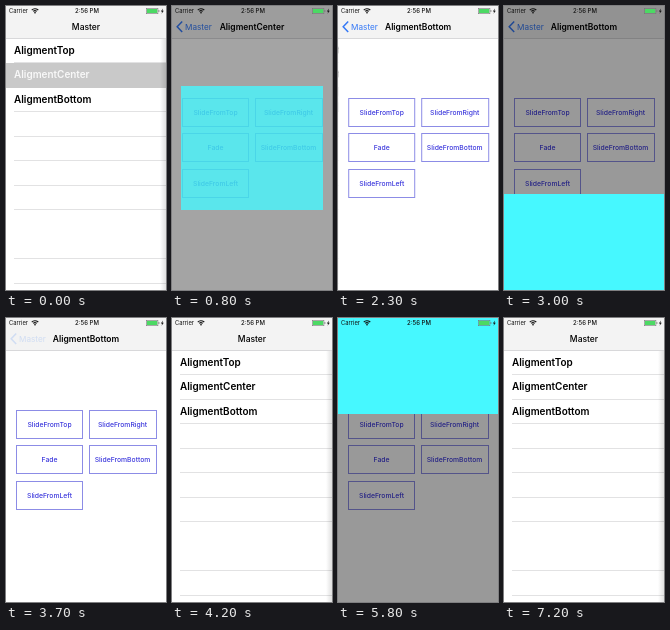
Recreate the animation shown at these times as an HTML page with a canvas. Size 160 by 284 pixels, loop 7.3 s.

```html
<!DOCTYPE html>
<html lang="en">
<head>
<meta charset="utf-8">
<style>
html, body { margin: 0; width: 100%; height: 100%; overflow: hidden; background: #fff; }
canvas { display: block; width: 160px; height: 284px; }
</style>
</head>
<body>
<canvas id="stage"></canvas>
<script>
const W = 160, H = 284, NAV = 33, LOOP = 7300, TICK = 100;
const BLUE = '#3478f6', CYAN = '#46f8ff';
const canvas = document.getElementById('stage');
const ctx = canvas.getContext('2d');
const ratio = window.devicePixelRatio || 1;
canvas.width = W * ratio;
canvas.height = H * ratio;

const rows = ['AligmentTop', 'AligmentCenter', 'AligmentBottom'];
const buttons = ['SlideFromTop', 'SlideFromRight', 'Fade', 'SlideFromBottom', 'SlideFromLeft'];

// Each visit: push a page, press a button, show and hide the popup, go back.
const visits = [
  { row: 1, push: 0, button: 2, press: 500, show: 600, hide: 1100, back: 1400 },
  { row: 2, push: 1900, button: 3, press: 2500, show: 2600, hide: 3200, back: 3700 },
  { row: 0, push: 4400, button: 0, press: 5000, show: 5100, hide: 6050, back: 6500 }
];

const clamp = v => Math.min(1, Math.max(0, v));
const easeOut = (v, power) => 1 - Math.pow(1 - clamp(v), power);
const span = (t, from, to, length, power) =>
  easeOut((t - from) / length, power) - easeOut((t - to) / length, power);

function box(color, x, y, w, h, alpha = 1) {
  ctx.globalAlpha = alpha;
  ctx.fillStyle = color;
  ctx.fillRect(x, y, w, h);
  ctx.globalAlpha = 1;
}

function text(str, x, y, size, weight, color, align = 'left', alpha = 1) {
  ctx.globalAlpha = clamp(alpha);
  ctx.font = `${weight} ${size}px Inter, sans-serif`;
  ctx.textAlign = align;
  ctx.textBaseline = 'alphabetic';
  ctx.fillStyle = color;
  ctx.fillText(str, x, y);
  ctx.globalAlpha = 1;
}

function drawMaster(offset, selected, highlight) {
  ctx.save();
  ctx.translate(offset, 0);
  box('#fff', 0, NAV, W, H - NAV);
  for (let i = 0; i < 10; i++) {
    if (i !== 7) box('#e2e2e3', 8, Math.round(56 + i * 24.5), W - 8, 1);
  }
  box('#c9c9c9', 0, Math.round(32 + selected * 24.5), W, 25, highlight);
  rows.forEach((name, i) => {
    const y = 47.6 + i * 24.5;
    const lit = i === selected ? highlight : 0;
    text(name, 8, y, 9.95, 600, '#000', 'left', 1 - lit);
    text(name, 8, y, 9.95, 600, '#f8f8f8', 'left', lit);
  });
  ctx.restore();
}

function drawDetail(x, pressed) {
  const shadow = ctx.createLinearGradient(x - 6, 0, x, 0);
  shadow.addColorStop(0, 'rgba(0,0,0,0)');
  shadow.addColorStop(1, 'rgba(0,0,0,.12)');
  box(shadow, x - 6, NAV, 6, H - NAV);
  ctx.save();
  ctx.translate(x, 0);
  box('#fff', 0, NAV, W, H - NAV);
  buttons.forEach((name, i) => {
    const left = i % 2 ? 83.5 : 10.5;
    const top = 92.5 + Math.round((i >> 1) * 35.4);
    ctx.strokeStyle = '#8c8ce6';
    ctx.lineWidth = 1;
    ctx.strokeRect(left, top, i % 2 ? 67 : 66, 28);
    text(name, left + 33, top + 16.6, 6.8, 500, i === pressed ? '#969696' : '#3a36dc', 'center');
  });
  ctx.restore();
}

function drawNav(title, open, backAlpha) {
  box('#f3f3f3', 0, 0, W, NAV);
  box('#d8d8da', 0, NAV - 1, W, 1);
  text('Master', 80 - 54 * open, 24, 8.5, 500, '#000', 'center', 1 - open * 1.5);
  text(title, 80 + 80 * (1 - open), 24, 8.5, 600, '#000', 'center', open);
  text('Master', 13 + 54 * (1 - open), 24, 8.2, 400, BLUE, 'left', backAlpha);
  ctx.globalAlpha = clamp(backAlpha);
  ctx.strokeStyle = BLUE;
  ctx.lineWidth = 1.5;
  ctx.beginPath();
  ctx.moveTo(10.2, 15.6);
  ctx.lineTo(5.2, 20.8);
  ctx.lineTo(10.2, 26);
  ctx.stroke();
  ctx.globalAlpha = 1;
}

function drawPopup(row, shown) {
  if (shown <= 0) return;
  box('#000', 0, 0, W, H, 0.4 * shown);
  if (row === 0) box(CYAN, 0, 96 * (shown - 1), W, 96);
  if (row === 1) box(CYAN, 9, 80, 142, 124, shown * shown);
  if (row === 2) box(CYAN, 0, H - 96 * shown, W, 96);
}

function drawStatus() {
  text('Carrier', 3, 7.2, 5.8, 400, '#111');
  text('2:56 PM', 81, 7.2, 6, 500, '#111', 'center');
  ctx.strokeStyle = '#111';
  ctx.lineWidth = 1.1;
  for (const r of [2.3, 4.3]) {
    ctx.beginPath();
    ctx.arc(29, 7, r, -Math.PI * 0.77, -Math.PI * 0.23);
    ctx.stroke();
  }
  box('#111', 28.3, 6, 1.4, 1.4);
  ctx.strokeStyle = '#777';
  ctx.lineWidth = 0.6;
  ctx.strokeRect(140.3, 2.3, 11.6, 5.4);
  box('#4cd964', 141, 3, 10.2, 4);
  box('#777', 152.5, 4, 0.8, 2);
  ctx.fillStyle = '#111';
  ctx.beginPath();
  [[157, 2.5], [154.8, 5.4], [156.2, 5.4], [155.5, 7.8], [157.8, 4.7], [156.4, 4.7]]
    .forEach(([x, y]) => ctx.lineTo(x, y));
  ctx.fill();
}

function draw(t) {
  const visit = visits.filter(v => v.push <= t).pop();
  const open = span(t, visit.push, visit.back, 450, 3);
  const shown = span(t, visit.show, visit.hide, 300, 2);
  const pressed = t >= visit.press && t <= visit.show ? visit.button : -1;
  const leaving = t >= visit.back;

  ctx.setTransform(ratio, 0, 0, ratio, 0, 0);
  box('#fff', 0, 0, W, H);
  drawMaster(-48 * open, visit.row, leaving ? open : 1);
  box('#000', 0, NAV, W, H - NAV, 0.1 * open);
  drawDetail(W * (1 - open), pressed);
  drawNav(rows[visit.row], open, open * (leaving ? 0.18 : 1));
  drawPopup(visit.row, shown);
  drawStatus();
}

const start = performance.now();
function frame() {
  const t = (performance.now() - start) % LOOP;
  draw(Math.floor(t / TICK) * TICK);
  requestAnimationFrame(frame);
}
frame();
</script>
</body>
</html>
```
